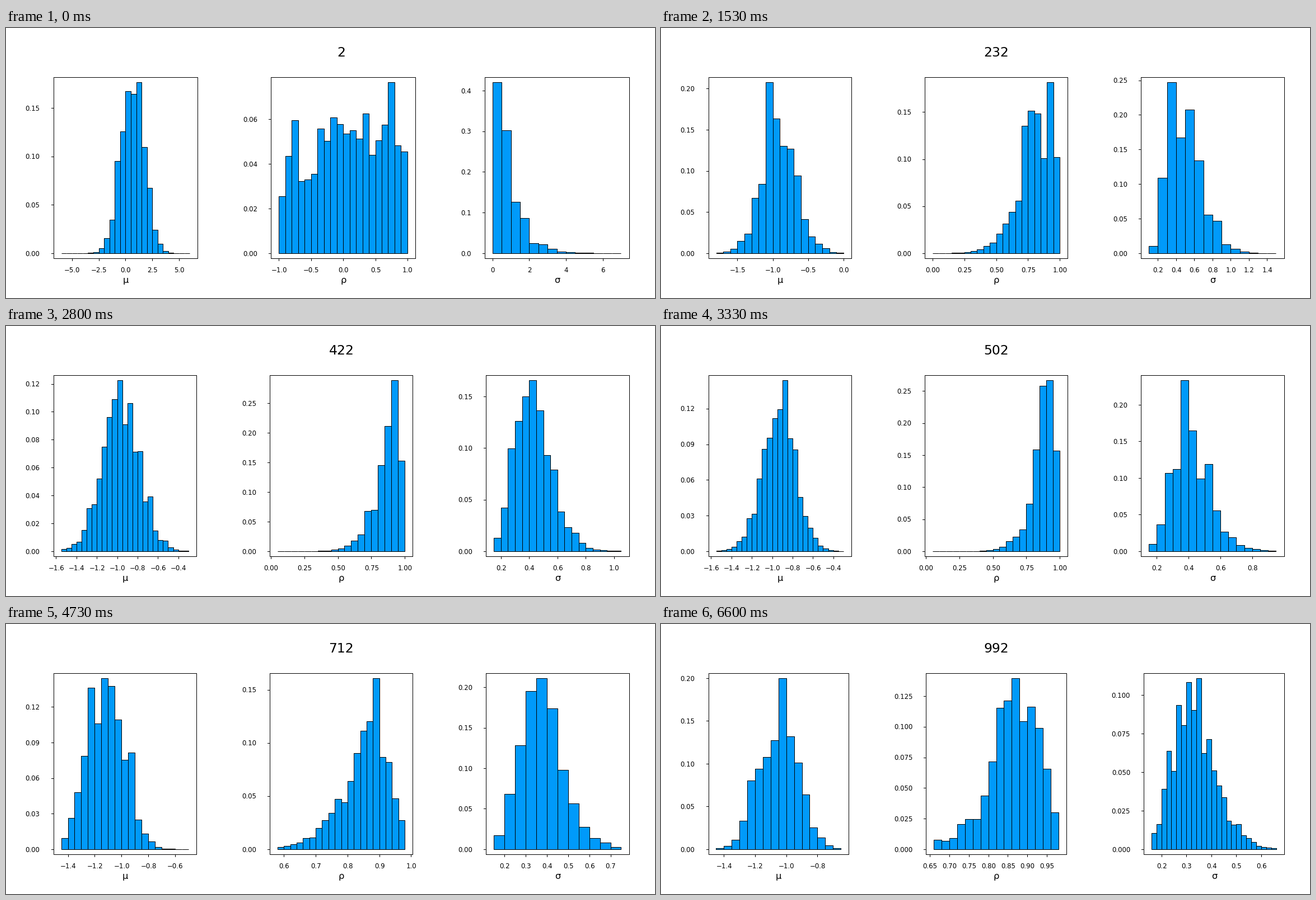
Recreate the animation shown at these times as a matplotlib script. Size 1159x483 px, loop 6670 ms.

```python
import math

import matplotlib.pyplot as plt
import numpy as np
from matplotlib.animation import FuncAnimation
from matplotlib.collections import LineCollection, PolyCollection

WIDTH, HEIGHT, DPI = 1159, 483, 100
PX = 72 / DPI                      # points per pixel
TOP, BOTTOM = 88.6, 412.5
RIGHT_PAD = 46
FRAMES, LOOP_MS = 200, 6670
UPDATES = 100                      # distinct charts in one loop
BLUE = "#009afa"

plt.rcParams["font.family"] = "DejaVu Sans"


def normal(x, mean, sd):
    return -((x - mean) / sd) ** 2 / 2


def beta(x, mean, sd):
    """Beta log density stretched over -1 to 1."""
    m, s = (1 + mean) / 2, sd / 2
    total = m * (1 - m) / s ** 2 - 1
    return (m * total - 1) * np.log1p(x) + ((1 - m) * total - 1) * np.log1p(-x)


def gamma(x, mean, sd):
    shape = (mean / sd) ** 2
    return (shape - 1) * np.log(x) - x * shape / mean


# Per parameter: log density, first spread, then mean and sampled range at KEYS
KEYS = np.array([2, 132, 342, 502, 712, 882])
PANELS = [
    ("μ", normal, 1.05, [.65, -.78, -1, -.95, -1.12, -1.05],
     [-6, -2.4, -1.5, -1.55, -1.45, -1.45], [6, .6, -.35, -.3, -.5, -.65]),
    ("ρ", beta, .56, [.07, .74, .84, .87, .85, .865],
     [-1, -.05, .05, .05, .58, .66], [1, 1, 1, 1, .98, .98]),
    ("σ", gamma, .75, [.77, .61, .44, .42, .38, .335],
     [0, 0, .15, .15, .15, .16], [7, 1.9, 1.2, .95, .75, .66]),
]


def contraction(step):
    """Spread left after a number of observations, 1 at the start."""
    return 1 / np.sqrt(1 + (step - 2) / 13)


def bin_width(span, most=25):
    sizes = (m * 10.0 ** e for e in range(-3, 2) for m in (1, 2, 5))
    return next(s for s in sizes if span / s < most + .01)


def posterior(step, rng, log_density, spread, means, lows, highs):
    """Bin edges and heights of the noisy posterior at a step."""
    now = contraction(step)
    mean, low, high = (np.interp(-now, -contraction(KEYS), track)
                       for track in (means, lows, highs))
    width = bin_width(high - low)
    first, last = round(low / width), round(high / width)
    bins, fine = last - first, 8
    x = width * (first + (np.arange(bins * fine) + .5) / fine)
    logs = log_density(x, mean, spread * now)
    heights = np.exp(logs - logs.max()).reshape(bins, fine).sum(axis=1)
    heights *= np.exp(.18 * rng.normal(size=bins))
    return width * np.arange(first, last + 1), heights / heights.sum()


def ticks(low, high):
    """Best scoring regular ticks inside the limits, and their decimals."""
    span, best, best_score = high - low, None, -1
    top = math.floor(math.log10(span)) + 1
    for z in range(top, top - 4, -1):
        for count in range(4, 9):
            for q, niceness in ((1, 1), (5, .9), (2, .7), (2.5, .5), (3, .2)):
                size = q * 10.0 ** z
                first, last = math.ceil(low / size), math.floor(high / size)
                if last - first + 1 != count:
                    continue
                score = ((1 - abs(count - 5) / 5) / 4 + (first <= 0 <= last) / 6
                         + .5 * span / ((count - 1) * size) + niceness / 4)
                if score > best_score + 1e-9:
                    best_score = score
                    best = (size * np.arange(first, last + 1),
                            max(0, (q == 2.5) - z))
    return best


def widen(low, high, share):
    pad = share * (high - low)
    return low - pad, high + pad


def crisp(v):
    return np.floor(v) + .5


fig = plt.figure(figsize=(WIDTH / DPI, HEIGHT / DPI), dpi=DPI, facecolor="white")
ax = fig.add_axes([0, 0, 1, 1], xlim=(0, WIDTH), ylim=(HEIGHT, 0))
ax.axis("off")


def label(x, baseline, text, size, ha="center"):
    ax.text(x, baseline, text, size=size * PX, ha=ha, va="baseline", color="black")


def number(value, decimals):
    return f"{value:.{decimals}f}".replace("-", "−")


def draw_panel(left, width, name, edges, heights, y_lim, y_ticks):
    x_lim = widen(edges[0], edges[-1], .0618)

    def to_x(v):
        return left + width * (v - x_lim[0]) / (x_lim[1] - x_lim[0])

    def to_y(v):
        return BOTTOM - (BOTTOM - TOP) * (v - y_lim[0]) / (y_lim[1] - y_lim[0])

    x0, x1, y0, y1 = crisp(left), crisp(left + width), crisp(TOP), crisp(BOTTOM)
    lines = [[(x0, y0), (x1, y0), (x1, y1), (x0, y1), (x0, y0)]]
    values, decimals = ticks(*x_lim)
    for v in values:
        x = crisp(to_x(v))
        lines.append([(x, y1), (x, y1 + 4.5)])
        label(to_x(v), 437.2, number(v, decimals), 11.7)
    values, decimals = y_ticks
    for v in values:
        y = crisp(to_y(v))
        lines.append([(x0 - 4.5, y), (x0, y)])
        label(left - 24.5, to_y(v) + 4.2, number(v, decimals), 11.7, "right")
    label(left + width / 2, 456, name, 16.2)

    xs, tops, base = crisp(to_x(edges)), crisp(to_y(heights)), crisp(to_y(0))
    bars = [[(a, base), (a, y), (b, y), (b, base)]
            for a, b, y in zip(xs, xs[1:], tops)]
    ax.add_collection(LineCollection(lines, colors="black", linewidths=PX,
                                     snap=False), autolim=False)
    ax.add_collection(PolyCollection(bars, facecolors=BLUE, edgecolors="black",
                                     linewidths=PX, snap=False), autolim=False)


def draw(frame):
    for artist in [*ax.texts, *ax.collections]:
        artist.remove()
    # Updates change half an update early, so that they fall on rounded times
    step = 2 + 10 * min((frame + 1) // 2, UPDATES - 1)
    rng = np.random.default_rng(step)

    charts = []
    for name, *model in PANELS:
        edges, heights = posterior(step, rng, *model)
        y_lim = widen(0, heights.max(), .03)
        charts.append((name, edges, heights, y_lim, ticks(*y_lim)))

    # The space left of each panel follows the width of its tick labels
    pads = [85 + 7.3 * (chart[-1][1] - 2) for chart in charts]
    width = (WIDTH - sum(pads) - 3 * RIGHT_PAD) / 3
    x = 0
    for pad, chart in zip(pads, charts):
        draw_panel(x + pad, width, *chart)
        x += pad + width + RIGHT_PAD
    label((pads[0] + WIDTH - RIGHT_PAD) / 2, 51.3, str(step), 23.5)
    return []


animation = FuncAnimation(fig, draw, frames=FRAMES, init_func=lambda: [],
                          interval=LOOP_MS / FRAMES, repeat=True, repeat_delay=0)
plt.show()
```
